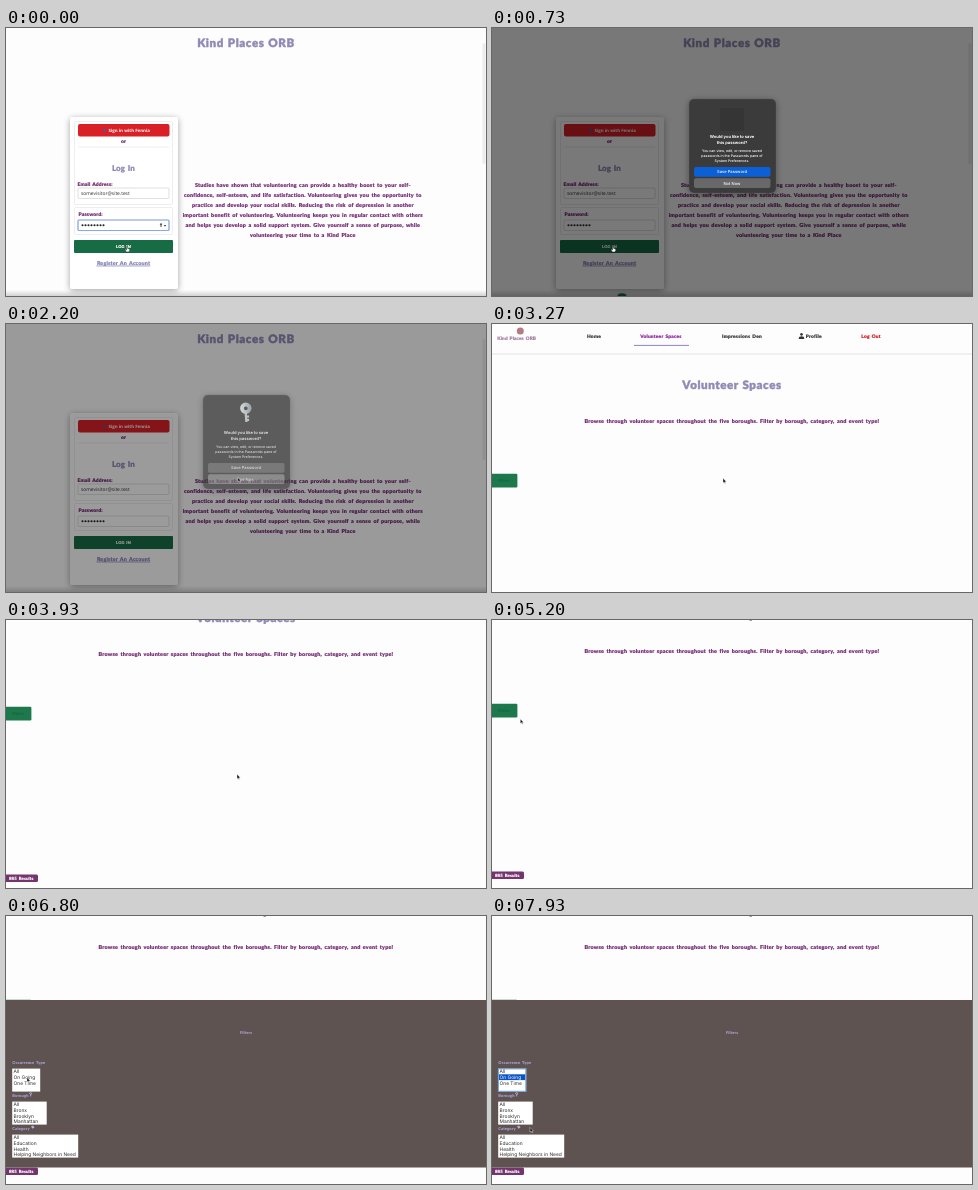
Recreate the animation shown at these times as an HTML page. Size 480 by 268 pixels, loop 8 s.

```html
<!DOCTYPE html>
<html lang="en">
<head>
<meta charset="utf-8">
<title>Volunteer site demo</title>
<style>
html, body { margin: 0; height: 100%; overflow: hidden; background: #fdfdfd; }
svg { display: block; width: 100vw; height: 100vh; }
text { font: 900 5px Lato, sans-serif; letter-spacing: .12px; word-spacing: .7px; text-rendering: geometricPrecision; color: #742873; fill: currentColor; stroke: currentColor; stroke-width: .15; }
.mid { text-anchor: middle; }
.title { font-size: 11.6px; letter-spacing: .55px; color: #8f8ab5; stroke-width: .4; }
.body { font-size: 5.4px; letter-spacing: .2px; word-spacing: .9px; }
.nav { font-size: 4.8px; letter-spacing: .22px; color: #333; }
.small { font-size: 4px; color: #aaa0d4; stroke-width: 0; }
.ui { font: 400 4.9px Inter, sans-serif; letter-spacing: 0; word-spacing: 0; color: #2c2c2c; stroke-width: 0; }
.form { font-family: "Open Sans", sans-serif; }
.semi { font-weight: 500; }
.bold { font-weight: 700; }
.white { color: #fff; }
</style>
</head>
<body>
<svg viewBox="0 0 480 268" preserveAspectRatio="none">
  <defs>
    <linearGradient id="foot" x2="0" y2="1"><stop stop-color="#fdfdfd"/><stop offset="1" stop-color="#d2d2d2"/></linearGradient>
    <linearGradient id="metal"><stop stop-color="#eef3f5"/><stop offset="1" stop-color="#a9b4b9"/></linearGradient>
    <filter id="shadow" x="-20%" y="-20%" width="140%" height="140%"><feDropShadow dx="0" dy="1.5" stdDeviation="3.4" flood-opacity=".36"/></filter>
  </defs>
  <rect width="480" height="268" fill="#fdfdfd"/>

  <g id="login">
    <rect y="262" width="480" height="6" fill="url(#foot)"/>
    <rect x="476.5" y="15" width="3" height="121" rx="1.5" fill="#ececec"/>
    <text class="title mid" x="240" y="19">Kind Places ORB</text>
    <rect x="64" y="89" width="108" height="172" rx="3" fill="#fff" filter="url(#shadow)"/>
    <g fill="#fff" stroke="#e2e2e2" stroke-width=".6">
      <rect x="68.5" y="93.5" width="98" height="83" rx="1"/>
      <rect x="68.5" y="179.5" width="98" height="27" rx="1"/>
      <path d="M72 119H163"/>
      <g stroke="#ccc"><rect x="72" y="160" width="91" height="10.5" rx="1"/><rect x="72" y="192" width="91" height="10.5" rx="1"/></g>
    </g>
    <rect x="72" y="96" width="91.5" height="12.5" rx="2" fill="#d92027"/>
    <circle cx="98.5" cy="102.2" r="1.5" fill="#4a5a9a"/>
    <text class="ui form bold white" style="font-size:4.4px" x="102.5" y="103.8">Sign in with Fennia</text>
    <text class="mid" x="117.5" y="115.3">or</text>
    <text class="title mid" style="font-size:8px;letter-spacing:.1px;stroke-width:.2" x="117.5" y="142.6">Log In</text>
    <text x="71.5" y="157.5">Email Address:</text>
    <text class="ui form" x="75" y="166.8">somevisitor@site.test</text>
    <text x="72.5" y="188">Password:</text>
    <path d="M76.5 197.3h21.2" stroke="#222" stroke-width="2.1" stroke-linecap="round" stroke-dasharray="0 3"/>
    <g id="focus" fill="none">
      <rect x="72" y="192" width="91" height="10.5" rx="1" stroke="#86a8ec" stroke-width="1.2"/>
      <path d="M155 195.5v3.5M153.9 196.2h2.2M158 197l1 1.2 1-1.2" stroke="#333" stroke-width=".9"/>
    </g>
    <rect x="68" y="212" width="99" height="13" rx="1" fill="#176c45"/>
    <text class="mid white" style="font-size:4px" x="117.5" y="220">LOG IN</text>
    <text class="body mid" style="color:#8581b5;letter-spacing:.12px" text-decoration="underline" x="117.5" y="236.7">Register An Account</text>
    <g id="story"></g>
    <ellipse id="blob" cx="130" cy="268" rx="4.5" ry="2.8" fill="#176c45"/>
  </g>

  <g id="browse">
    <circle cx="28.3" cy="7" r="3.5" fill="#b27c82"/>
    <text style="font-size:4.7px;color:#a27c9c" x="5.3" y="16">Kind Places ORB</text>
    <text class="nav" x="95" y="13.5">Home</text>
    <text class="nav" style="color:#8a1f9c" x="148.2" y="13.5">Volunteer Spaces</text>
    <rect x="142" y="20.9" width="55" height="1" fill="#8f83c4"/>
    <text class="nav" x="230" y="13.5">Impressions Den</text>
    <path d="M306.8 15v-1.2q0-1.6 2.7-1.6t2.7 1.6V15ZM309.5 9a1.4 1.4 0 1 1-.01 0Z" fill="#333"/>
    <text class="nav" x="313.8" y="14.3">Profile</text>
    <text class="nav" style="color:#d2141e" x="369.3" y="13.5">Log Out</text>
    <path d="M0 30H480" stroke="#dedede" stroke-width=".8"/>
    <g id="content">
      <text class="title mid" x="240" y="65">Volunteer Spaces</text>
      <text class="body mid" x="240" y="98.8">Browse through volunteer spaces throughout the five boroughs. Filter by borough, category, and event type!</text>
      <rect x="-2" y="149.8" width="27.4" height="13.6" rx="1.2" fill="#1d794b"/>
      <text class="mid" style="font-size:4px;color:#196b43" x="12" y="158">Filters</text>
      <rect x="-2" y="317.5" width="34" height="7.5" rx="1.5" fill="#74356f"/>
      <text class="white" style="font-size:4.3px" x="3" y="322.8">885 Results</text>
    </g>
  </g>

  <g id="panel">
    <rect y="84" width="480" height="167.5" fill="#5f5351"/>
    <text class="small mid" x="240" y="118">Filters</text>
    <g id="lists"></g>
    <path d="M24.7 180.5v-2.5M24.7 176.6a1 1 0 1 1-.01 0" fill="none" stroke="#b9aee0" stroke-width=".8"/>
    <path d="M25 210.5l2-1 1.5 2-2 1.3Z" fill="#b9aee0"/>
    <g id="picked">
      <rect x="6.4" y="152.9" width="27.4" height="22.4" fill="none" stroke="#6ea2dc" stroke-width="1"/>
      <rect x="7" y="158.3" width="26.2" height="5.8" fill="#0a55c4"/>
      <text class="ui white" x="7.5" y="163">On Going</text>
    </g>
  </g>

  <rect id="dim" width="480" height="268"/>
  <g id="dialog">
    <rect x="197" y="71" width="87" height="94" rx="5" fill="#3b3b3b" stroke="#555" stroke-width=".5" filter="url(#shadow)"/>
    <rect id="slot" x="228" y="80" width="24" height="23" fill="#353535"/>
    <g id="key" fill="none" stroke="url(#metal)">
      <circle cx="239.8" cy="84.3" r="3.8" stroke-width="3.8"/>
      <path d="M239.6 88l.8 10M240.5 92.5h2.6M240.7 95.8h2.4" stroke="#d3dbdf" stroke-width="2.2"/>
    </g>
    <g class="mid">
      <text class="ui bold white" style="font-size:4.1px" x="240" y="110.3">Would you like to save</text>
      <text class="ui bold white" style="font-size:4.1px" x="240" y="115.6">this password?</text>
      <g id="hint"></g>
      <rect id="save" x="202" y="139" width="76.5" height="9.7" rx="2"/>
      <rect id="skip" x="202" y="150.3" width="76.5" height="9.7" rx="2"/>
      <text class="ui semi white" style="font-size:4.1px" x="240" y="145.4">Save Password</text>
      <text class="ui semi white" style="font-size:4.1px" x="240" y="156.7">Not Now</text>
    </g>
  </g>

  <g id="cursor" stroke-width=".4">
    <path id="arrow" d="M0 0V4.6L1.1 3.6 1.8 5.3 2.6 5 1.9 3.4H3.4Z" fill="#111" stroke="#fff"/>
    <path id="hand" d="M-.5 0q.5-.6 1 0V1.8l2.2.6V4L2 5.4H-.6L-2 3.2l.5-.5 1 .8Z" fill="#fff" stroke="#111"/>
  </g>
</svg>
<script>
const $ = id => document.getElementById(id);
const LOOP = 8000;

const line = (s, x, y, cls, size) =>
  `<text class="${cls}" x="${x}" y="${y}"${size ? ` style="font-size:${size}px"` : ''}>${s}</text>`;

$('story').innerHTML = [
  'Studies have shown that volunteering can provide a healthy boost to your self-',
  'confidence, self-esteem, and life satisfaction. Volunteering gives you the opportunity to',
  'practice and develop your social skills. Reducing the risk of depression is another',
  'important benefit of volunteering. Volunteering keeps you in regular contact with others',
  'and helps you develop a solid support system. Give yourself a sense of purpose, while',
  'volunteering your time to a Kind Place'
].map((s, i) => line(s, 296.8, 158.8 + i * 10, 'body mid')).join('');

$('hint').innerHTML = [
  'You can view, edit, or remove saved',
  'passwords in the Passwords pane of',
  'System Preferences.'
].map((s, i) => line(s, 240, 124.3 + i * 4.7, 'ui semi white', 3.5)).join('');

$('lists').innerHTML = [
  ['Occurrence Type', 28, ['All', 'On Going', 'One Time']],
  ['Borough', 34.5, ['All', 'Bronx', 'Brooklyn', 'Manhattan']],
  ['Category', 66, ['All', 'Education', 'Health', 'Helping Neighbors in Need']]
].map(([label, w, items], i) => {
  const y = 147.8 + i * 33;
  return line(label, 6.3, y, 'small') +
    `<rect x="6.2" y="${y + 4.8}" width="${w}" height="23" fill="#fff"/>` +
    items.map((s, j) => line(s, 7.5, y + 9.6 + j * 5.6, 'ui')).join('');
}).join('');

// time, x, y of the pointer tip
const path = [
  [0, 121, 218.5], [1270, 121, 218.5], [1930, 232, 153], [2130, 232, 153], [2330, 231, 154.3],
  [4270, 231, 154.3], [4530, 50, 122], [5000, 50, 122], [5200, 28.3, 99], [5330, 15.8, 95.3],
  [6200, 15.8, 95.3], [6800, 21, 161.5], [7000, 21, 161.5], [7130, 21.5, 162],
  [7670, 21.5, 162], [7930, 38, 211.5], [LOOP, 38, 211.5]
];

const ramp = (t, a, b) => Math.min(1, Math.max(0, (t - a) / (b - a)));
const smooth = p => p * p * (3 - 2 * p);
const show = (id, on) => $(id).style.display = on ? '' : 'none';
const fade = (id, v) => $(id).setAttribute('opacity', v);
const move = (id, x, y) => $(id).setAttribute('transform', `translate(${x} ${y})`);

function pointer(t) {
  const i = path.findIndex(k => k[0] > t);
  const [t0, x0, y0] = path[i - 1], [t1, x1, y1] = path[i];
  const p = smooth(ramp(t, t0, t1));
  return [x0 + (x1 - x0) * p, y0 + (y1 - y0) * p];
}

function draw(t) {
  const leave = 1 - ramp(t, 2130, 2330);
  show('login', t < 2600);
  show('focus', t < 200);
  show('blob', t > 400 && t < 930);
  fade('dim', .61 * smooth(ramp(t, 270, 870)) * leave);
  fade('dialog', smooth(ramp(t, 200, 600)) * leave);
  fade('key', ramp(t, 900, 1130));
  fade('slot', 1 - ramp(t, 900, 1130));
  $('save').setAttribute('fill', t < 1930 ? '#0b60d6' : '#686868');
  $('skip').setAttribute('fill', t < 1930 ? '#686868' : '#858585');

  show('browse', t >= 2600);
  fade('content', ramp(t, 2600, 3000));
  move('browse', 0, -66 * smooth(ramp(t, 3470, 4000)));

  show('panel', t > 5360);
  move('panel', -480 * (1 - ramp(t, 5360, 6000)) ** 3, 0);
  show('picked', t >= 7270);

  const hand = t < 1270 || t > 5270 && t < 6200;
  show('hand', hand);
  show('arrow', !hand);
  move('cursor', ...pointer(t));
}

function tick() {
  draw(performance.now() % LOOP);
  requestAnimationFrame(tick);
}
tick();
</script>
</body>
</html>
```
